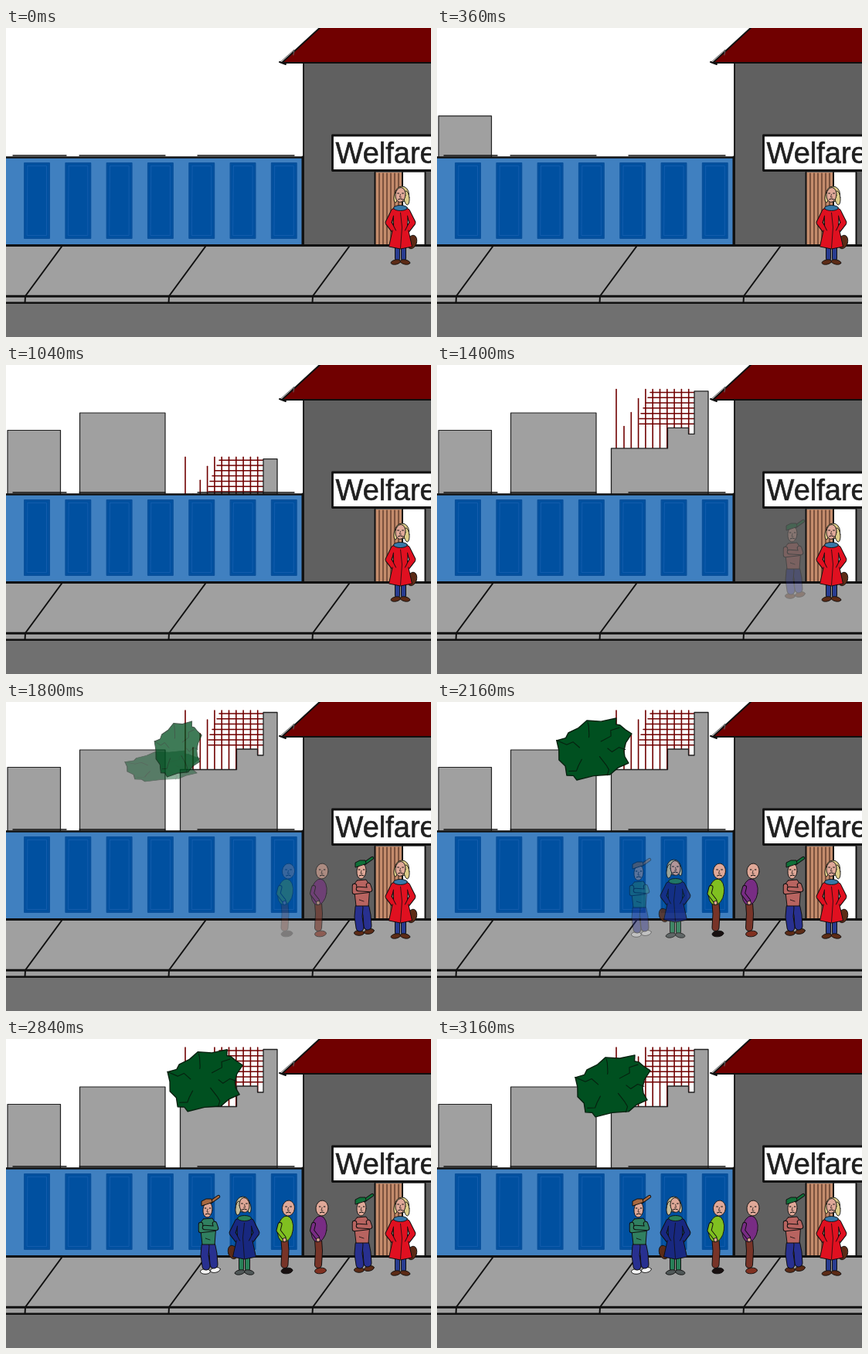
An HTML page with a canvas for the animation above (3.2 s loop, 550x400 px).

```html
<!DOCTYPE html>
<html lang="en">
<head>
<meta charset="utf-8">
<title>Street</title>
<style>
html, body { margin: 0; width: 100%; height: 100%; overflow: hidden; background: #fff; }
canvas { display: block; }
</style>
</head>
<body>
<canvas id="stage" width="550" height="400"></canvas>
<script>
const LOOP = 3200, STEP = 40, W = 550, H = 400;
const ink = '#101010';

const ramp = (t, a, b) => Math.max(0, Math.min(1, (t - a) / (b - a)));
const mix = (a, b, k) => a + (b - a) * k;

function random(seed) {
  return () => (seed = seed * 16807 % 2147483647) / 2147483647;
}

function prepare(c) {
  c.width = W;
  c.height = H;
  const ctx = c.getContext('2d');
  ctx.lineJoin = ctx.lineCap = 'round';
  return ctx;
}

let g = prepare(document.getElementById('stage'));

// Runs the drawing code on a separate canvas, so that it can fade as one piece
function layer(draw) {
  const c = document.createElement('canvas'), back = g;
  g = prepare(c);
  draw();
  g = back;
  return c;
}

function stamp(image, alpha) {
  if (alpha <= 0) return;
  g.globalAlpha = alpha;
  g.drawImage(image, 0, 0);
  g.globalAlpha = 1;
}

// --- Shapes ---

function rect(color, x, y, w, h) {
  g.fillStyle = color;
  g.fillRect(x, y, w, h);
}

function outline(width, color = ink) {
  g.strokeStyle = color;
  g.lineWidth = width;
  g.stroke();
}

function line(p, width = 1, color = ink) {
  g.beginPath();
  p.forEach(([x, y]) => g.lineTo(x, y));
  outline(width, color);
}

function poly(p, fill, width = 1, color = ink) {
  g.beginPath();
  p.forEach(([x, y]) => g.lineTo(x, y));
  g.closePath();
  g.fillStyle = fill;
  g.fill();
  outline(width, color);
}

function box(x, y, w, h, fill, width, color = ink) {
  poly([[x, y], [x + w, y], [x + w, y + h], [x, y + h]], fill, width, color);
}

function oval(x, y, rx, ry, fill, turn = 0) {
  g.beginPath();
  g.ellipse(x, y, rx, ry, turn, 0, Math.PI * 2);
  g.fillStyle = fill;
  g.fill();
  outline(0.9);
}

// Outlined arm or leg
function limb(p, width, color) {
  line(p, width + 2);
  line(p, width, color);
}

// --- People: drawn around x = 0 with the feet near y = 100 ---

const SKIN = '#dfa898';

function face(x, y, rx, ry) {
  oval(x, y, rx, ry, SKIN, 0.1);
  for (const s of [-1, 1]) line([[x + s * 3 - 1, y - 2], [x + s * 3 + 1, y - 2]], 1);
  line([[x, y - 1], [x - 1, y + 3], [x + 1, y + 3]], 0.7);
  line([[x - 3, y + 6], [x, y + 5], [x + 3, y + 6]], 1);
}

function coatWoman({ coat, hair, collar, legs, boots }) {
  for (const s of [-1, 1]) {
    limb([[s * 4, 80], [s * 4, 96]], 5, legs);
    oval(s * 6, 101, 6.5, 3, boots, s * 0.2);
  }
  oval(15, 75, 6, 9, '#5c2b16', 0.3);
  oval(2, 13, 9, 10, hair);
  oval(8, 18, 3.5, 9, hair, -0.1);
  oval(-6, 17, 2.5, 7, hair, 0.1);
  for (const s of [-1, 1]) limb([[s * 9, 36], [s * 16, 50], [s * 9, 59]], 6, coat);
  poly([[-10, 32], [10, 32], [9, 54], [15, 81], [0, 84], [-15, 81], [-9, 54]], coat);
  for (const s of [-1, 1]) {
    line([[s * 9, 35], [s * 15, 50], [s * 10, 57]], 5, coat);
    line([[s * 9, 41], [s * 11, 50], [s * 6, 60]], 1);
  }
  line([[0, 37], [2, 56], [0, 83]], 0.8);
  oval(0, 31, 9, 3.5, collar);
  face(0, 14, 6.5, 9.5);
}

function capMan({ cap, shirt, shoes }) {
  oval(-3, 99, 6.5, 3.3, shoes);
  oval(10, 97, 6.5, 3.3, shoes, -0.2);
  limb([[5, 66], [7, 76], [8, 90]], 9, '#283090');
  limb([[-3, 66], [-4, 78], [-2, 92]], 9, '#283090');
  face(0, 19, 6, 10);
  poly([[-6, 31], [6, 30], [11, 38], [9, 64], [-7, 64], [-10, 37]], shirt);
  limb([[-9, 38], [-9, 46], [8, 44]], 4.5, shirt);
  limb([[9, 37], [11, 43], [-4, 42]], 4.5, shirt);
  line([[-3, 56], [3, 58]], 0.8);
  limb([[4, 9], [14, 2]], 2.5, cap);
  poly([[-8, 14], [-8, 8], [-2, 5], [5, 5], [6, 9]], cap);
}

function baldMan({ shirt, shoes }) {
  limb([[-1, 60], [0, 74], [-1, 92]], 8, '#783428');
  oval(2, 100, 7.5, 3.8, shoes, -0.1);
  oval(0, 46, 10, 17, shirt, 0.15);
  limb([[-7, 40], [-9, 48], [-2, 57]], 4, shirt);
  oval(-1, 60, 2.5, 2.5, SKIN);
  face(4, 19, 8, 10);
}

function person(kind, x, y, look, side = 1) {
  return layer(() => {
    g.translate(x, y);
    g.scale(side, 1);
    kind(look);
  });
}

const first = person(coatWoman, 510.5, 202,
  { coat: '#e01020', hair: '#dccc88', collar: '#3878a8', legs: '#283c90', boots: '#5c2b16' });

const queue = [
  { start: 1280, image: person(capMan, 460, 200, { cap: '#107038', shirt: '#b86460', shoes: '#5c2b16' }) },
  { start: 1560, image: person(baldMan, 405, 200, { shirt: '#782c84', shoes: '#803020' }) },
  { start: 1700, image: person(baldMan, 361.5, 200, { shirt: '#80c020', shoes: '#181010' }) },
  { start: 1840, image: person(coatWoman, 308.5, 201,
    { coat: '#182880', hair: '#c4bb98', collar: '#288058', legs: '#288058', boots: '#505858' }, -1) },
  { start: 2000, image: person(capMan, 261, 202, { cap: '#a86840', shirt: '#308060', shoes: '#f4f4f4' }) }
];

// --- Scenery ---

function fence() {
  rect('#4080c0', 0, 167, 384, 115);
  for (let i = 0; i < 7; i++) {
    const x = 24 + i * 53.3;
    box(x, 175, 32, 97, '#0050a0', 2, '#08509c');
    box(x + 3.5, 178.5, 25, 90, '#0050a0', 0.8, '#1860b0');
  }
  for (const [from, to] of [[9, 78], [95, 206], [248, 373]]) line([[from, 165], [to, 165]], 1.3);
  line([[0, 167.5], [384, 167.5]], 2.6);
  line([[384, 167], [384, 282]], 3);
}

function house() {
  rect('#606060', 385, 45, 165, 237);
  line([[385, 46], [385, 282]], 1.8);
  poly([[408, -2], [357, 45], [560, 45], [560, -2]], '#700000', 2);
  line([[355, 44], [373, 28], [372, 35]], 1, '#666');
  line([[354, 44], [362, 47]], 2);

  rect('#fff', 512, 187, 30, 94);
  rect('#c48c6c', 478, 187, 34, 94);
  for (let x = 483; x < 512; x += 5) line([[x, 188], [x, 281]], 1.2, '#4c2c20');
  for (const x of [477.5, 513, 542.5]) line([[x, 187], [x, 281]], 2);

  box(422.5, 139, 140, 45.5, '#fff', 2.8);
  g.font = '38px "Liberation Sans", Arial, sans-serif';
  g.fillStyle = g.strokeStyle = '#202020';
  g.lineWidth = 0.6;
  g.fillText('Welfare', 426.5, 175);
  g.strokeText('Welfare', 426.5, 175);
}

function pavement() {
  rect('#a0a0a0', 0, 282, W, 74);
  rect('#707070', 0, 356, W, 44);
  for (const [y, width] of [[281.5, 2.8], [347.3, 3], [355.8, 2.6]]) line([[0, y], [W, y]], width);
  for (let i = 0; i < 3; i++) {
    const x = 25 + i * 186;
    line([[x + 47, 283], [x, 347], [x - 0.5, 356]], 2);
  }
}

const street = layer(() => { fence(); house(); pavement(); });

function block(x, w, top) {
  box(x, top, w, 200, '#a0a0a0', 1.2, '#202020');
}

// Unfinished tower, still dy pixels below its full height
function tower(dy) {
  const red = '#700000';
  g.save();
  g.translate(0, dy);
  line([[232, 11], [232, 88]], 1.6, red);
  for (let i = 0; i < 10; i++) {
    const x = 242 + i * 9.3;
    line([[x, Math.max(11, 59 - i * 18)], [x, 88]], 1.6, red);
  }
  for (let i = 0; i < 7; i++) {
    const y = 15 + i * 6.8;
    line([[Math.max(262, 276 - i * 3), y], [333, y]], 1.5, red);
  }
  poly([[225.5, 300], [225.5, 87.5], [298.5, 87.5], [298.5, 61], [325.5, 61], [325.5, 69],
    [333, 69], [333, 13.5], [351, 13.5], [351, 300]], '#a0a0a0', 1.3, '#202020');
  g.restore();
}

// --- Tree: a few corners around its middle, roughened between them ---

const corners = [[-49, -11], [-34, -21], [-10, -37], [28, -40], [33, -31], [48, -20],
  [38, 2], [44, 18], [20, 33], [-23, 40], [-36, 34], [-46, 14]];
const rnd = random(11);
const leaf = corners.flatMap(([x, y], i) => {
  const [x2, y2] = corners[(i + 1) % corners.length];
  const k = 0.9 + rnd() * 0.1;
  return [[x, y], [mix(x, x2, 0.5) * k, mix(y, y2, 0.5) * k]];
});
const twigs = corners.filter((_, i) => i % 2 === 0).map(([x, y]) =>
  [0.95, 0.75, 0.55, 0.35].map(k => [x * k + rnd() * 8 - 4, y * k + rnd() * 8 - 4]));

function crown(x, y, sx, sy) {
  g.save();
  g.translate(x, y);
  g.scale(sx, sy);
  poly(leaf, '#005020', 1.4, '#06200f');
  twigs.forEach(p => line(p, 1.1, '#06200f'));
  g.restore();
}

function tree(t) {
  const grow = ramp(t, 1680, 1800), form = ramp(t, 1800, 2000);
  if (!grow) return;
  const swing = Math.sin((t - 2610) / 183) * ramp(t, 1800, 2240);
  const x = 223 + 37 * swing, y = 61 - 8 * Math.max(0, swing) ** 2;
  const wing = layer(() => crown(mix(240, 203, grow), 83, grow, 0.5 * grow));
  const top = layer(() => crown(x, y, grow * mix(0.63, 1, form), grow * mix(0.9, 1, form)));
  stamp(wing, 0.45 * (1 - form));
  stamp(top, mix(0.75, 1, form));
}

// --- Playback ---

function draw(t) {
  rect('#fff', 0, 0, W, H);
  if (t > 0) block(2, 68.5, mix(167, 84.5, ramp(t, 0, 560)));
  if (t > 400) block(95.5, 110.5, mix(167, 62, ramp(t, 400, 960)));
  if (t > 850) tower(mix(154, 0, ramp(t, 852, 1484)));
  tree(t);
  stamp(street, 1);
  stamp(first, 1);
  queue.forEach(({ start, image }) => stamp(image, ramp(t, start, start + 400)));
}

const begin = performance.now();
function tick() {
  const t = (performance.now() - begin) % LOOP;
  draw(Math.floor(t / STEP) * STEP);
  requestAnimationFrame(tick);
}
draw(0);
requestAnimationFrame(tick);
</script>
</body>
</html>
```
